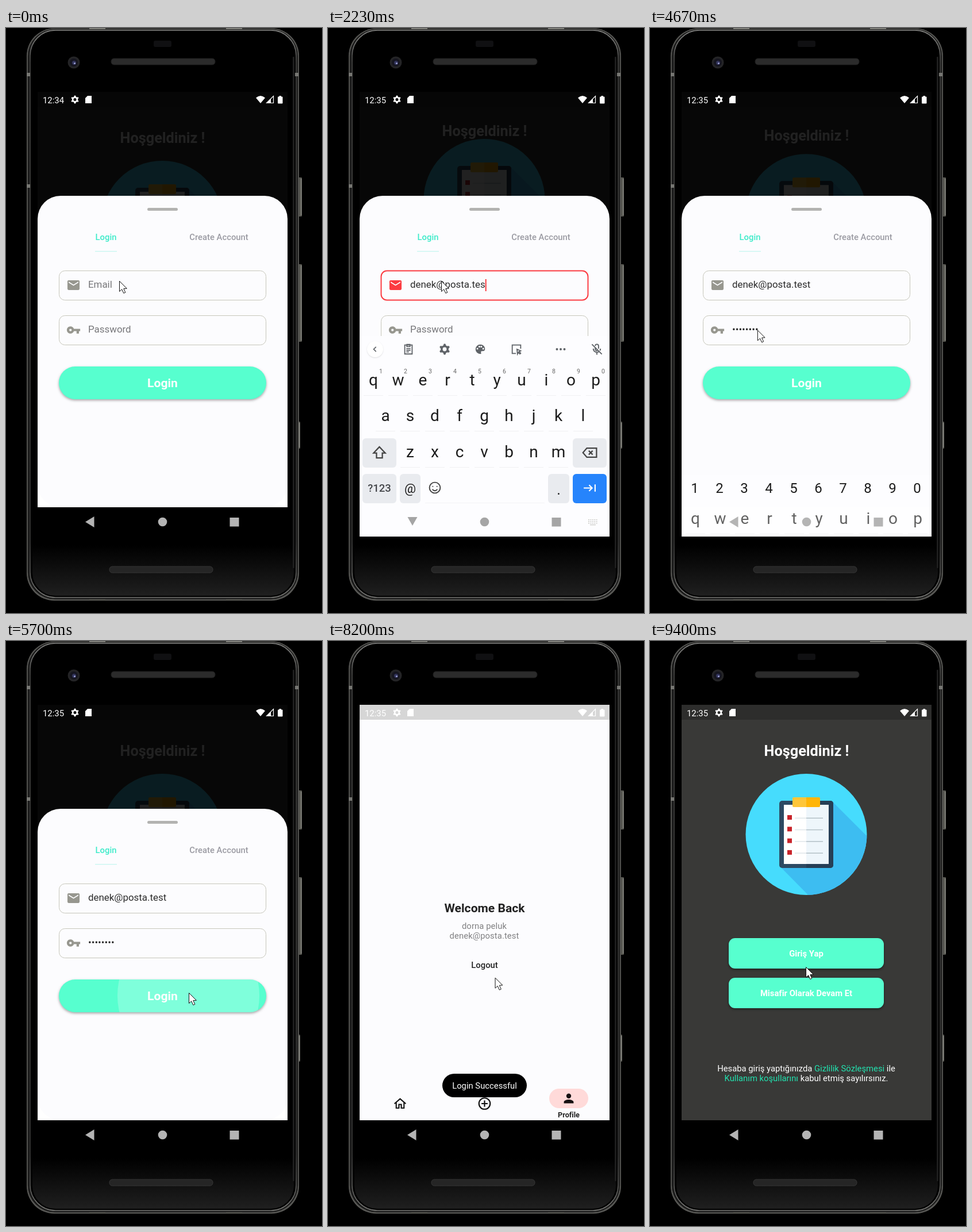
Animation of 550x1018 px, one loop 9430 ms. Source, as an HTML page with a canvas:

```html
<!DOCTYPE html>
<html lang="tr">
<head>
<meta charset="utf-8">
<title>Login flow</title>
<style>
html, body { margin: 0; width: 100%; height: 100%; overflow: hidden; background: #000; }
canvas { display: block; width: 550px; height: 1018px; }
</style>
</head>
<body>
<canvas id="stage"></canvas>
<script>
const W = 550, H = 1018, LOOP = 9430;
const SHEET = '#fcfcfe', MINT = '#57ffcf', RED = '#fb3b41', INK = '#1c1c1c', TOOL = '#5f6368';
const EMAIL = 'denek@posta.test', NAME = 'dorna peluk';
const canvas = document.getElementById('stage');
const c = canvas.getContext('2d');
const dpr = window.devicePixelRatio || 1;
canvas.width = W * dpr;
canvas.height = H * dpr;

const part = (t, a, b) => Math.min(1, Math.max(0, (t - a) / (b - a)));
const easeOut = p => 1 - (1 - p) ** 2;
const easeInOut = p => p * p * (3 - 2 * p);

const ICON = {
  mail: 'M20 4H4c-1.1 0-2 .9-2 2v12c0 1.1.9 2 2 2h16c1.1 0 2-.9 2-2V6c0-1.1-.9-2-2-2zM20 8l-8 5-8-5V6l8 5 8-5z',
  key: 'M12.65 10C11.8 7.7 9.6 6 7 6c-3.3 0-6 2.7-6 6s2.7 6 6 6c2.6 0 4.8-1.7 5.65-4H17v4h4v-4h2v-4zM7 14c-1.1 0-2-.9-2-2s.9-2 2-2 2 .9 2 2-.9 2-2 2z',
  person: 'M12 12a4 4 0 1 0 0-8 4 4 0 0 0 0 8zM12 14c-2.7 0-8 1.3-8 4v2h16v-2c0-2.7-5.3-4-8-4z',
  home: 'M2.5 12.2L12 4l9.500 8.200M5.500 10v9.500h4.500v-6h4v6h4.500V10',
  add: 'M21 12a9 9 0 1 1-18 0a9 9 0 1 1 18 0M12 7v10M7 12h10',
  shift: 'M12 3L3 12.500h4.500V20h9v-7.500H21z',
  back: 'M8 5h15v14H8L2 12zM11 9l6 6M17 9l-6 6',
  next: 'M2 12h14M11 7l5 5-5 5M21 6v12',
  check: 'M5 12l5 5 9-10',
  left: 'M14 7l-5 5 5 5',
  clip: 'M5 4h14v17H5zM9 3h6v4H9zM8 11h8M8 14h8M8 17h5',
  palette: 'M12 3a9 9 0 1 0 0 18c2 0 2-1.500 1.500-2.500-.7-1.500.2-3 1.800-3H17a4 4 0 0 0 4-4c0-5-4-8.500-9-8.500z',
  note: 'M20 11V4H4v16h7M13 12l7 3-3 1.500 3 3-1.500 1.500-3-3-1.500 3z',
  mic: 'M9 6a3 3 0 0 1 6 0v5M9 9v3a3 3 0 0 0 4 2.500M5.500 11a6.500 6.500 0 0 0 10 5.500M18.500 11a6 6 0 0 1-1 3.500M12 18v4M3 3l18 18',
  smile: 'M21 12a9 9 0 1 1-18 0a9 9 0 1 1 18 0M8 14.500a4.500 4.500 0 0 0 8 0M8.500 9v1.500M15.500 9v1.500'
};

function icon(name, x, y, size, color, line) {
  c.save();
  c.translate(x - size / 2, y - size / 2);
  c.scale(size / 24, size / 24);
  const p = new Path2D(ICON[name]);
  if (line) {
    c.strokeStyle = color;
    c.lineWidth = line;
    c.stroke(p);
  } else {
    c.fillStyle = color;
    c.fill(p, 'evenodd');
  }
  c.restore();
}

function box(x, y, w, h, r, fill, stroke, line = 1) {
  c.beginPath();
  c.roundRect(x, y, w, h, r);
  if (fill) { c.fillStyle = fill; c.fill(); }
  if (stroke) { c.strokeStyle = stroke; c.lineWidth = line; c.stroke(); }
}

function disc(x, y, r, fill) {
  c.beginPath();
  c.arc(x, y, r, 0, 7);
  c.fillStyle = fill;
  c.fill();
}

function poly(fill, ...pts) {
  c.beginPath();
  for (let i = 0; i < pts.length; i += 2) c.lineTo(pts[i], pts[i + 1]);
  c.closePath();
  c.fillStyle = fill;
  c.fill();
}

function text(s, x, y, size, color, weight = 400, align = 'center', space = 0) {
  c.font = `${weight} ${size}px Roboto, sans-serif`;
  c.letterSpacing = space + 'px';
  c.textAlign = align;
  c.fillStyle = color;
  c.fillText(s, x, y);
}

function shadowed(draw, blur, dy, color) {
  c.save();
  c.shadowColor = color;
  c.shadowBlur = blur * dpr;
  c.shadowOffsetY = dy * dpr;
  draw();
  c.restore();
}

function gear(x, y, r, color) {
  c.beginPath();
  for (let i = 0; i < 24; i++) {
    const a = (i + 0.5) * Math.PI / 12, d = i % 4 < 2 ? r : r * 0.72;
    c.lineTo(x + d * Math.sin(a - 0.26), y - d * Math.cos(a - 0.26));
  }
  c.closePath();
  c.moveTo(x + r * 0.36, y);
  c.arc(x, y, r * 0.36, 0, 7);
  c.fillStyle = color;
  c.fill('evenodd');
}

function phone() {
  for (const [y, h] of [[260, 68], [411, 135], [685, 47]]) {
    const w = h === 47 ? 2 : 5;
    box(508, y, w + 2, h, 1, '#55554f');
    box(508 + w, y + 2, 1.5, h - 4, 0, '#8a8a84');
  }
  box(36, 0.5, 474, 996, 48, '#5a5a57');
  box(38, 2, 470, 992, 47, '#181818', '#30302e', 1);
  const rim = c.createLinearGradient(0, 2, 0, 992);
  rim.addColorStop(0, '#8a8a88');
  rim.addColorStop(0.06, '#4a4a48');
  rim.addColorStop(0.9, '#3a3a39');
  rim.addColorStop(1, '#777774');
  box(42, 4, 463, 987, 44, '#000', rim, 1.5);
  const glow = c.createLinearGradient(0, 900, 0, 990);
  glow.addColorStop(0, '#000');
  glow.addColorStop(1, '#202020');
  box(46, 900, 455, 88, [0, 0, 40, 40], glow);
  box(499, 50, 3, 890, 1, '#1d1d1d');
  for (const [x, y] of [[36, 78], [36, 272], [503, 78]]) box(x, y, 6, 6, 0, '#777773');
  for (const x of [145, 383]) {
    box(x, 0, 28, 2, 0, '#85857f');
    box(x, 994, 28, 2, 0, '#55554f');
  }
  box(257, 22, 31, 11, 3, '#101012');
  disc(118, 60, 10.5, '#242426');
  disc(118, 60, 7, '#15151f');
  disc(118.5, 60.5, 3.5, '#33355c');
  disc(119.5, 61.5, 1.5, '#a0a4d8');
  box(183, 53, 181, 11, 5, '#2b2b2b', '#1d1d1d');
  box(180, 937, 180, 11, 5, '#252525', '#353535');
}

function welcome(lift) {
  box(55, 111, 435, 723, 0, '#393937');
  box(55, 111, 435, 26, 0, '#2d2d2c');
  text('Hoşgeldiniz !', 272.5, 200 - 12 * lift, 25.3, '#fff', 700);
  c.save();
  c.translate(0, -38 * lift);
  disc(272, 336.5, 105.5, '#46dcfd');
  c.save();
  c.beginPath();
  c.arc(272, 336.5, 105.5, 0, 7);
  c.clip();
  poly('#3dbdf1', 317, 279, 400, 362, 400, 460, 293, 460, 227, 393);
  c.restore();
  box(225, 278, 94, 117, 5, '#2d4a63');
  box(272, 278, 47, 117, [0, 5, 5, 0], '#263f56');
  box(233, 285, 39, 103, 0, '#fff');
  box(272, 285, 39, 103, 0, '#eef6fb');
  box(248, 272, 24, 17, [2, 0, 0, 2], '#fec63a');
  box(272, 272, 24, 17, [0, 2, 2, 0], '#ffb508');
  for (let i = 0; i < 4; i++) {
    const y = 303 + i * 20.3;
    box(239, y, 8, 8, 0, '#c9242b');
    box(252, y + 4.500, 20, 1.5, 0, '#dfe6e9');
    box(272, y + 4.500, 29, 1.5, 0, '#b3c0c7');
  }
  c.restore();
  for (const [y, label] of [[517, 'Giriş Yap'], [586, 'Misafir Olarak Devam Et']]) {
    shadowed(() => box(137, y, 270, 53, 11, MINT), 4, 2, 'rgba(0,0,0,.45)');
    text(label, 272, y + 32, 14.8, '#fff', 700);
  }
  runs(749, [['Hesaba giriş yaptığınızda ', '#fff'], ['Gizlilik Sözleşmesi', '#22e3b0'], [' ile', '#fff']]);
  runs(766, [['Kullanım koşullarını', '#22e3b0'], [' kabul etmiş sayılırsınız.', '#fff']]);
}

function runs(y, list) {
  c.font = '400 14.8px Roboto, sans-serif';
  c.letterSpacing = '0px';
  const widths = list.map(r => c.measureText(r[0]).width);
  let x = 272 - widths.reduce((a, b) => a + b) / 2;
  list.forEach(([s, color], i) => {
    text(s, x, y, 14.8, color, 400, 'left');
    x += widths[i];
  });
}

function field(y, name, hint, value, focus, caret) {
  box(92.500, y + 0.5, 360, 51, 10, null, focus ? RED : '#c6c6ba', focus ? 2 : 1);
  icon(name, 117.5, y + 25.5, 25.3, focus ? RED : '#97978f');
  text(value || hint, 143, y + 30, 16.9, value ? '#2c2c2c' : '#77777a', 400, 'left');
  if (focus && caret) box(143 + (value ? c.measureText(value).width : 0), y + 15, 2, 21, 0, RED);
}

function sheet(t) {
  box(55, 500, 435, 334, 0, '#fff');
  box(55, 292, 435, 542, 40, SHEET);
  box(246, 313, 53, 5, 2.5, '#b3b3b1');
  text('Login', 174, 369, 14.8, '#3cebc9', 500);
  text('Create Account', 370.5, 369, 14.8, '#9b9ba3', 500);
  box(155, 388, 38, 1.2, 0, '#c4f6ef');

  const onEmail = t > 380 && t < 2620, onPass = t >= 2620 && t < 4550;
  const typed = Math.floor(part(t, 1200, 2250) * EMAIL.length);
  const count = Math.floor(part(t, 2870, 3800) * 8.001 + 0.55);
  const n = Math.min(8, count);
  const bare = t < 3850 && n > 0;
  const secret = bare ? '•'.repeat(n - 1) + 'a' : '•'.repeat(n);
  field(422, 'mail', 'Email', EMAIL.slice(0, typed), onEmail, typed > 0);
  field(500, 'key', 'Password', secret, onPass, true);

  if (t > 780 && t < 1180) {
    box(109, 389, 68, 35, 8, '#fff');
    text('Paste', 124, 410, 14.8, '#3c3c3c', 400, 'left');
    disc(143, 473, 11.2, RED);
    poly(RED, 143, 457, 151, 465.500, 135, 465.500);
  }

  shadowed(() => box(92, 589, 361, 57, 28.5, MINT), 4, 2, 'rgba(0,0,0,.35)');
  const press = part(t, 5480, 5920);
  if (press > 0 && t < 6250) {
    c.save();
    c.beginPath();
    c.roundRect(92, 589, 361, 57, 28.5);
    c.clip();
    disc(317.5, 617, 246 * press, `rgba(255,255,255,${0.24 * (1 - part(t, 5950, 6250))})`);
    c.restore();
  }
  text('Login', 272.5, 625, 21.1, '#fff', 700);
}

function keyCap(x, y, w, fill = '#e9ebef') {
  box(x, y, w, 51, 6, fill);
}

function keyboard(pass) {
  box(55, 536, 435, 349, 0, '#fdfdff');
  if (pass) {
    [...'1234567890'].forEach((k, i) => text(k, 78 + i * 43, 568.500, 24, INK));
  } else {
    shadowed(() => disc(82, 559, 14, '#fff'), 2, 1, 'rgba(0,0,0,.12)');
    icon('left', 82, 559, 20, TOOL, 2);
    icon('clip', 140, 559, 22, TOOL, 2);
    gear(203, 559, 9.5, TOOL);
    icon('palette', 265, 559, 22, TOOL);
    for (let i = 0; i < 4; i++) disc(260 + i * 3.4, 558 - (i % 3 ? 3.5 : 0), 1.5, '#fdfdff');
    icon('note', 328, 559, 22, TOOL, 2);
    for (const x of [398.500, 405, 411.5]) disc(x, 559, 2, TOOL);
    icon('mic', 468, 559, 23, TOOL, 2);
  }
  [['qwertyuiop', 79, 622], ['asdfghjkl', 100, 684], ['zxcvbnm', 143, 747]].forEach(([row, x0, y]) => {
    [...row].forEach((k, i) => {
      const x = x0 + i * 43;
      box(x - 17, y + 17, 34, 1, 0, '#f0f0f2');
      text(k, x, y, 28, INK);
      if (!pass && row.length === 10) text((i + 1) % 10, x + 13, 601, 10.5, '#666');
    });
  });
  keyCap(60, 714, 59);
  icon('shift', 89.5, 739, 27, '#444', 2);
  keyCap(426, 714, 59);
  icon('back', 455, 739, 27, '#444', 2);
  keyCap(60, 776, 59);
  text('?123', 89.5, 807, 18.5, '#45474b', 500);
  keyCap(125, 776, 36);
  text(pass ? ',' : '@', 143, pass ? 812 : 809, pass ? 25 : 22.3, INK);
  if (!pass) icon('smile', 186, 800, 25, '#444', 1.9);
  box(169, 826, 208, 1, 0, '#f3f3f5');
  keyCap(383, 776, 37);
  text('.', 401.5, 812, 25, INK);
  keyCap(426, 776, 59, '#2684fc');
  icon(pass ? 'check' : 'next', 455.5, 800.500, 25, '#fff', 2.1);
}

function profile(t) {
  const loaded = t > 7300;
  box(55, 111, 435, 723, 0, SHEET);
  text('Welcome Back', 272.5, 472, 21.1, '#222', 700);
  text(loaded ? NAME : 'null null', 272, 501, 14.8, '#808082', 400, 'center', 0.1);
  text(loaded ? EMAIL : 'null', 272, 518, 14.8, '#808082', 400, 'center', 0.1);
  const press = part(t, 8800, 9040);
  if (press) box(237, 547, 71, 33, 16.5, `rgba(0,0,0,${0.11 * press})`);
  text('Logout', 272.5, 569, 14.8, '#222', 500);
  icon('home', 125.5, 805, 25, '#111', 2);
  icon('add', 272.5, 805, 26, '#111', 2);
  box(385, 779, 68, 34, 17, '#ffdad9');
  icon('person', 419, 796, 25.3, '#161011');
  text('Profile', 419, 829, 12.7, '#222', 600);
}

// Page entry: fade plus zoom about the page centre
function enter(p, draw) {
  if (p <= 0) return;
  const s = 0.85 + 0.15 * easeOut(p);
  c.save();
  c.beginPath();
  c.rect(55, 111, 435, 723);
  c.clip();
  c.globalAlpha = Math.min(1, p * 2);
  c.translate(272.5, 472.5);
  c.scale(s, s);
  c.translate(-272.5, -472.5);
  draw();
  c.restore();
}

function toast(t) {
  const a = part(t, 6690, 6860) * (1 - part(t, 8500, 8750));
  if (!a) return;
  c.save();
  c.globalAlpha = a;
  box(199, 753, 147, 41, 20.5, '#000');
  text('Login Successful', 272.5, 779, 14.8, '#fff');
  c.restore();
}

function status(t) {
  text(t < 2000 ? '12:34' : '12:35', 64, 130.500, 14.9, '#fff', 400, 'left');
  gear(120, 124.5, 7, '#fff');
  poly('#fff', 142, 118, 149, 118, 149, 131, 138, 131, 138, 122);
  c.beginPath();
  c.moveTo(443, 131);
  c.lineTo(435, 121.5);
  c.quadraticCurveTo(443, 114.5, 451, 121.5);
  c.fillStyle = '#fff';
  c.fill();
  c.beginPath();
  c.moveTo(465.5, 118.5);
  c.lineTo(465.5, 130.5);
  c.lineTo(453.5, 130.5);
  c.closePath();
  c.strokeStyle = '#fff';
  c.lineWidth = 1.2;
  c.stroke();
  poly('#fff', 461, 123, 461, 131, 453, 131);
  box(473, 119.5, 8.5, 12, 1, '#fff');
  box(475.5, 118, 3.5, 2, 0, '#fff');
}

function navBar(k) {
  if (k > 0) {
    c.globalAlpha = k;
    box(55, 834, 435, 51, 0, '#fdfdff');
    c.globalAlpha = 1;
  }
  const grey = k > 0.5 ? '#a5a5a5' : '#b4b4b4';
  if (k > 0.5) {
    poly(grey, 138.5, 851, 155.5, 851, 147, 866);
    for (let i = 0; i < 15; i++) box(453 + (i % 5) * 3.4, 855 + Math.floor(i / 5) * 3, 2, 1.4, 0, '#c8c8c4');
    box(456, 864, 10, 1.2, 0, '#c8c8c4');
  } else {
    poly(grey, 138, 859.5, 153.5, 850, 153.5, 869);
  }
  disc(272.5, 859.5, 7.8, grey);
  box(389.5, 852, 16, 15.5, 0, grey);
}

const TRACK = [[0, 197, 440], [2300, 197, 440], [2570, 177, 519], [4550, 177, 519],
  [5300, 318, 612], [7700, 318, 612], [8600, 271, 567], [LOOP, 271, 567]];

function pointer(t) {
  const i = TRACK.findIndex(k => k[0] > t);
  const [a, x0, y0] = TRACK[i - 1], [b, x1, y1] = TRACK[i];
  const p = easeInOut(part(t, a, b));
  c.save();
  c.translate(x0 + (x1 - x0) * p, y0 + (y1 - y0) * p);
  poly('#fff', 0.5, 0.5, 0.5, 18.5, 4.7, 14.7, 7.8, 21.5, 10.8, 20.2, 7.8, 13.6, 13.3, 13.3);
  c.strokeStyle = '#111';
  c.lineWidth = 1;
  c.stroke();
  c.restore();
}

function frame(t) {
  c.setTransform(dpr, 0, 0, dpr, 0, 0);
  c.fillStyle = '#000';
  c.fillRect(0, 0, W, H);
  phone();
  c.save();
  c.beginPath();
  c.rect(55, 111, 435, 774);
  c.clip();
  const rise = easeOut(part(t, 480, 760)) * (1 - easeInOut(part(t, 4520, 4760)));
  const page = part(t, 6720, 7020);
  if (page < 1) {
    welcome(rise);
    box(55, 111, 435, 723, 0, 'rgba(0,0,0,.87)');
    sheet(t);
  }
  if (rise > 0) {
    c.save();
    c.translate(0, (1 - rise) * 349);
    keyboard(t >= 2620);
    c.restore();
  }
  const leave = part(t, 9235, 9390);
  enter(page, () => profile(t));
  if (page > 0 && leave < 1) {
    c.globalAlpha = Math.min(1, page * 2);
    box(55, 111, 435, 26, 0, '#d6d6d6');
    c.globalAlpha = 1;
  }
  enter(leave, () => welcome(0));
  toast(t);
  status(t);
  navBar(rise);
  pointer(t);
  c.restore();
}

const start = performance.now();
function tick() {
  frame((performance.now() - start) % LOOP);
  requestAnimationFrame(tick);
}
tick();
</script>
</body>
</html>
```
